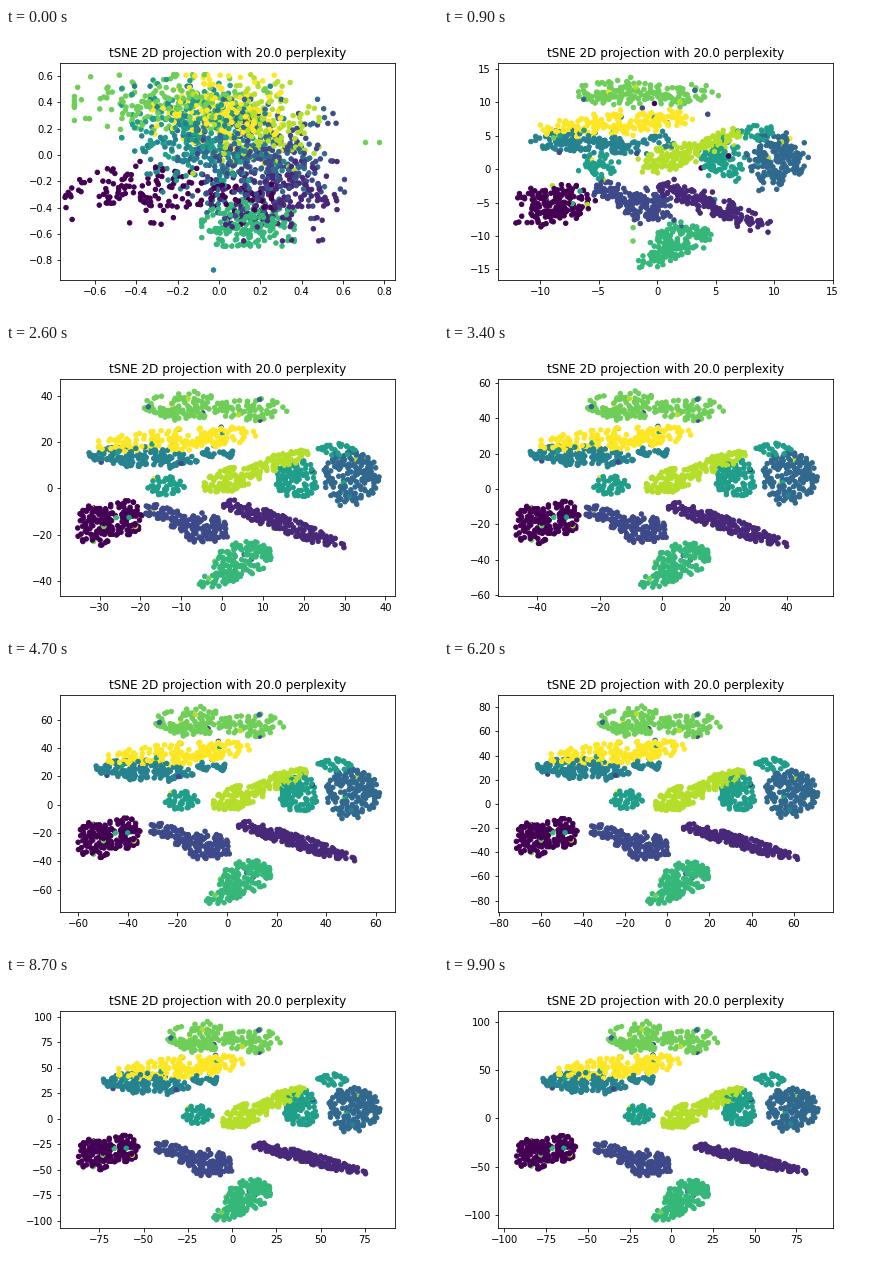
Write a matplotlib script that moves like this. It is 432 by 288 pixels and loops after 10 s.

```python
import numpy as np
import matplotlib.pyplot as plt
from matplotlib.animation import FuncAnimation

FRAMES, STEP = 100, 100
W, H = 432, 288
LEFT, RIGHT, TOP, BOTTOM = 54, 388.8, 34.56, 252
SETTLED, LAST = 1.8, 9.9
FADE = .45
PER_DIGIT = 180
rng = np.random.default_rng(12)

# Opening cloud of each digit: centre and spread on the stage
CLOUDS = [(150, 165, 55, 15), (268, 173, 30, 19), (265, 138, 35, 25),
          (245, 128, 35, 27), (198, 117, 38, 28), (185, 102, 33, 24),
          (242, 195, 22, 11), (165, 74, 46, 13), (250, 95, 30, 24),
          (212, 85, 31, 18)]

# Settled patches of each digit: centre and half axes
PATCHES = [
    [(88, 183, 19, 22), (117, 175, 21, 20)],
    [(268, 179, 70, 9)],
    [(152, 167, 19, 8), (192, 183, 30, 15)],
    [(343, 134, 30, 29)],
    [(135, 115, 60, 10), (217, 111, 18, 5)],
    [(290, 136, 23, 20), (333, 106, 20, 6), (150, 143, 20, 10)],
    [(236, 213, 32, 18), (211, 234, 24, 8)],
    [(172, 62, 45, 14), (245, 66, 36, 11)],
    [(222, 134, 32, 12), (275, 116, 33, 8)],
    [(170, 97, 90, 11)],
]

# Later drift of each digit: tilt, shift right, shift down, tightening down
DRIFT = [(-25, -2, -3, .7), (22, 37, 4, .55), (8, 10, 5, .85), (0, 4, 0, .74),
         (3, 2, -8, 1), (0, 14, -4, .95), (-12, 9, 5, .85), (0, 14, -1, 1.1),
         (-14, 12, 6, .95), (-4, 5, -6, .95)]


def progress(t):
    return max(0, np.log(max(t, SETTLED) / SETTLED) / np.log(LAST / SETTLED))


def limits_at(t):
    """Axis limits, growing almost steadily and then slowing."""
    p, early = progress(t), np.exp(-t / FADE)
    half_x = .81 * early + t / (.0634 + .0056 * max(t - 3.6, 0))
    half_y = half_x * (1.155 - .033 * p - .135 * early)
    mid_x = half_x * (.05 - .085 * p)
    mid_y = half_y * (.016 * np.sin(1.2 * np.pi * p) - .15 * early)
    return mid_x - half_x, mid_x + half_x, mid_y - half_y, mid_y + half_y


def patch(n, x, y, a, b, tilt):
    """Random points filling a ragged, tilted ellipse."""
    r = np.sqrt(rng.random(n)) * rng.uniform(.94, 1.06, n)
    th = rng.random(n) * 2 * np.pi
    u, v = a * r * np.cos(th), b * r * np.sin(th)
    c, s = np.cos(np.radians(tilt)), np.sin(np.radians(tilt))
    return np.column_stack((x + c * u - s * v, y + s * u + c * v))


def digit_points(digit):
    tilt, dx, dy, squeeze = DRIFT[digit]
    shapes = np.array(PATCHES[digit], float)
    area = shapes[:, 2] * shapes[:, 3]
    counts = np.round(PER_DIGIT * area / area.sum()).astype(int)
    mid = np.vstack([patch(n, *shape, tilt) for n, shape in zip(counts, shapes)])
    centre = mid.mean(axis=0)
    scale = (.9 if digit < 4 else .72, squeeze)
    end = centre + (mid - centre) * scale + (dx, dy)

    label = np.full(len(mid), digit)
    stray = rng.random(len(mid)) < .025
    label[stray] = rng.integers(0, 10, stray.sum())
    clouds = np.array(CLOUDS, float)[label]
    noise = np.clip(rng.normal(size=mid.shape), -2.1, 2.1)
    return clouds[:, :2] + clouds[:, 2:] * noise, mid, end, label


parts = [np.concatenate(p) for p in zip(*map(digit_points, range(10)))]
order = rng.permutation(len(parts[3]))
first, mid, end, label = (p[order] for p in parts)

# Lone points far from the opening cloud
sevens = np.flatnonzero(label == 7)
first[sevens[:2]] = (373.5, 114.5), (359.5, 114.5)
first[np.flatnonzero(label == 4)[0]] = 207.5, 242


def points_at(t):
    if t < SETTLED:
        u = (1 - np.exp(-t / FADE)) / (1 - np.exp(-SETTLED / FADE))
        return first + (mid - first) * u
    return mid + (end - mid) * progress(t)


fig = plt.figure(figsize=(W / 72, H / 72), dpi=72)
ax = fig.add_axes([LEFT / W, 1 - BOTTOM / H, (RIGHT - LEFT) / W, (BOTTOM - TOP) / H])
ax.set_title('tSNE 2D projection with 20.0 perplexity')
dots = ax.scatter(first[:, 0], first[:, 1], c=label, s=20, linewidths=1,
                  cmap='viridis', vmin=0, vmax=9)


def draw(i):
    t = i * STEP / 1000
    x0, x1, y0, y1 = limits_at(t)
    ax.set_xlim(x0, x1)
    ax.set_ylim(y0, y1)
    px, py = points_at(t).T
    dots.set_offsets(np.column_stack((
        x0 + (px - LEFT) / (RIGHT - LEFT) * (x1 - x0),
        y0 + (BOTTOM - py) / (BOTTOM - TOP) * (y1 - y0))))
    return dots,


anim = FuncAnimation(fig, draw, frames=FRAMES, interval=STEP, repeat=True,
                     repeat_delay=0, blit=False)
plt.show()
```
